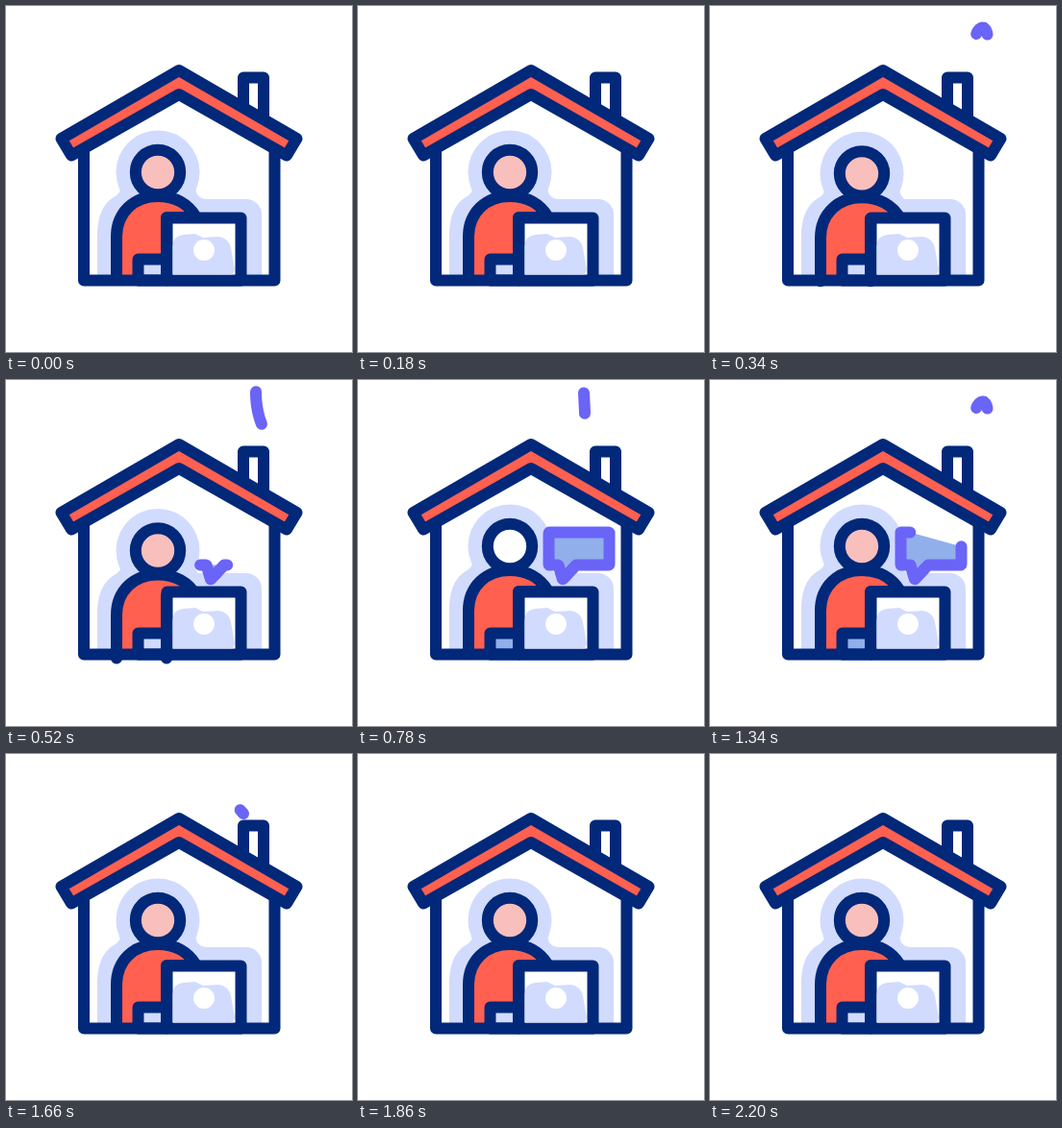
Recreate the animation shown at these times as an HTML page. Size 360 by 360 pixels, loop 2220 ms.

```html
<!DOCTYPE html>
<html lang="en">
<head>
<meta charset="utf-8">
<title>Working at home</title>
<style>
  html, body { margin: 0; height: 100%; overflow: hidden; background: #fff; }
  svg { display: block; width: 100%; height: 100%; }
  .line, .accent { fill: none; stroke-width: 12; stroke-linecap: round; stroke-linejoin: round; }
  .line { stroke: #02287a; }
  .accent { stroke: #6a64f7; }
  .halo { fill: #d1dbfd; }
  .red { fill: #ff6050; }
  .white { fill: #fff; }
</style>
</head>
<body>
<svg viewBox="0 0 360 360">
  <path class="halo" d="M190 284V201H250a16 16 0 0 1 16 16V284Z"/>
  <g id="person">
    <circle class="halo" cx="158" cy="173" r="43.500"/>
    <path class="halo" d="M95 284V240C95 218 101 206 112 199Q120 194 119 190H197Q199 201 208 201V220H190V284Z"/>
    <path class="line red" d="M115 285V240C115 215 133 198 158 198C176 198 190 206 198 220H167V285"/>
    <circle id="head" class="line" cx="158" cy="173" r="23.200"/>
  </g>
  <path id="arm" class="line" d="M137.500 285.500V263.500H167V285.500Z"/>
  <path class="line white" d="M247 108V74.500H268V118"/>
  <path class="line" d="M81 150V285.500H279.500V150"/>
  <path class="line red" d="M180 67L302.500 138L292 155.500L180 92L68 155.500L57.500 138Z"/>

  <path class="line white" d="M167.500 285.500V220.500H244.500V285.500Z"/>
  <path class="halo" d="M173.500 279.500V250Q174 239 184 238L197 237L205 241L222 240Q232 242 234 252L238 274L236 279.500Z"/>
  <circle class="white" cx="206" cy="254" r="11"/>
  <g id="moving"></g>
</svg>
<script>
const LOOP = 2220, SPEED = 0.39;
const NS = "http://www.w3.org/2000/svg";
const person = document.getElementById("person");
const head = document.getElementById("head");
const arm = document.getElementById("arm");
const moving = document.getElementById("moving");

const clamp = (v, lo, hi) => Math.min(hi, Math.max(lo, v));
const smooth = (t, start, span) => {
  const p = clamp((t - start) / span, 0, 1);
  return p * p * (3 - 2 * p);
};

// A curve of which only the stretch between two lengths is shown.
function trimmed(d, fill = "none") {
  const curve = document.createElementNS(NS, "path");
  curve.setAttribute("d", d);
  const shape = document.createElementNS(NS, "polyline");
  shape.setAttribute("class", "accent");
  shape.style.fill = fill;
  moving.append(shape);
  const length = curve.getTotalLength();
  return {
    length,
    show(from, to) {
      from = clamp(from, 0, length);
      to = clamp(to, 0, length);
      const points = [];
      if (to > from) {
        const steps = Math.ceil(to - from);
        for (let i = 0; i <= steps; i++) {
          const p = curve.getPointAtLength(from + (to - from) * i / steps);
          points.push(p.x.toFixed(2) + "," + p.y.toFixed(2));
        }
      }
      shape.setAttribute("points", points.join(" "));
    }
  };
}

// Starts and ends on the top edge, opposite the tail.
const bubble = trimmed("M241 158.500H261.500V192.500H227L213 207.500L208.500 192.500H198.500V158.500H241", "#91afea");
const tip = 109.500;

const wisps = [
  { start: 209, end: 258, curve: trimmed("M268 60C272 48 275 40 277 29.500C279 24 282 22.500 284 22.500C286 22.500 288 26 288.500 29.500") },
  { start: 394, end: 482, curve: trimmed("M262 60C266 54 267 50 266 46C262 36 260 24 260 13L262 -10") },
  { start: 648, end: 703, curve: trimmed("M247 62C237 51 235 44 236 34L235 13V-10"), secondCap: 36 }
];

function draw(t) {
  const open = smooth(t, 425, 320) - smooth(t, 1220, 320);
  bubble.show(tip * (1 - open), open > 0 ? tip + (bubble.length - tip) * open : 0);

  const second = t >= 1100;
  const puff = second ? t - 1000 : t;
  for (const { start, end, curve, secondCap } of wisps) {
    const cap = second && secondCap || curve.length;
    curve.show((puff - end) * SPEED, Math.min((puff - start) * SPEED, cap));
  }

  const nod = 4.5 * (smooth(t, 240, 280) - smooth(t, 520, 240));
  person.setAttribute("transform", `translate(0 ${nod})`);
  head.style.fill = t >= 560 && t < 1220 ? "#fff" : "#f9bfbc";
  arm.style.fill = t >= 560 && t < 1540 ? "#91afea" : "#d1dbfd";
}

const began = performance.now();
function tick() {
  draw((performance.now() - began) % LOOP);
  requestAnimationFrame(tick);
}
tick();
</script>
</body>
</html>
```
